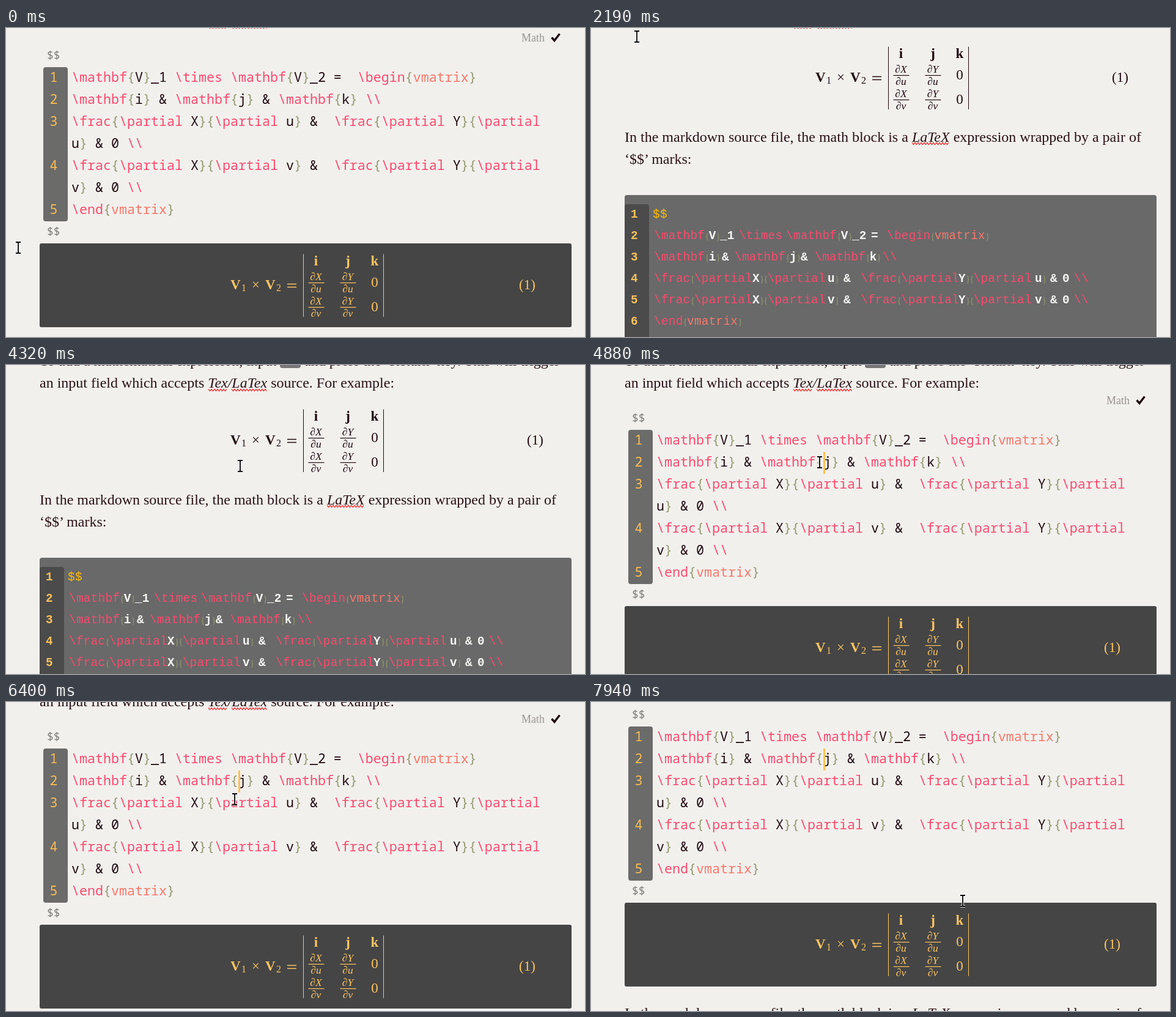
An HTML page for the animation above (8000 ms loop, 947 by 505 pixels).

```html
<!DOCTYPE html>
<html lang="en">
<head>
<meta charset="utf-8">
<title>Math block editing</title>
<style>
html, body { margin: 0; width: 100%; height: 100%; overflow: hidden; background: #f2f0ed; }
svg { display: block; }
text { white-space: pre; }
.prose { font: 24px "Liberation Serif", serif; fill: #2a1216; }
.prose .it { font-style: italic; }
.label { font: 18px "Liberation Serif", serif; fill: #979490; }
.fence { font: 18px "Noto Sans Mono", monospace; fill: #7d7d7a; }
.code { font: 21.67px "Noto Sans Mono", monospace; fill: #200a10; }
.code .cmd, .slab .cmd { fill: #fb4a6e; }
.code .env, .slab .env { fill: #f6796b; }
.code .brace { fill: #949a72; }
.code .num { fill: #fabd55; text-anchor: middle; }
.slab { font: 19.3px "Liberation Mono", monospace; letter-spacing: .32px; fill: #f7f7f5; }
.slab .plain { font-weight: bold; }
.slab .brace { font: 15px "Liberation Serif", serif; letter-spacing: -.8px; fill: #959a70; }
.slab .num { fill: #f9c25c; font-weight: bold; text-anchor: middle; }
.slab .dollar { fill: #fdbc05; }
.math { font: 23px "Liberation Serif", serif; fill: currentColor; }
.math .b { font-weight: bold; }
.math .sub { font-size: 16px; }
.math .frac { font-size: 17.5px; font-style: italic; }
.math .mid { text-anchor: middle; }
.math path { stroke: currentColor; fill: none; }
.wave { stroke: #ee2222; stroke-width: 1.2; fill: none; }
</style>
</head>
<body>
<svg id="stage" width="947" height="505" viewBox="0 0 947 505"></svg>
<script>
const raw = String.raw;
const range = n => [...Array(n).keys()];
const esc = s => s.replace(/&/g, "&amp;").replace(/</g, "&lt;");
const text = (x, y, s, cls = "") => `<text x="${x}" y="${y}" class="${cls}">${s}</text>`;
const rect = (x, y, w, h, fill, r = 0) =>
  `<rect x="${x}" y="${y}" width="${w}" height="${h}" rx="${r}" fill="${fill}"/>`;

function kind(token) {
  if (token[0] === "\\") return "cmd";
  if (token === "vmatrix") return "env";
  if (token === "$$") return "dollar";
  return /^[{}]+$/.test(token) ? "brace" : "plain";
}

function highlight(line) {
  return line.match(/\\[a-z]+|\\\\|vmatrix|[{}]+|[^\\{}]+/g)
    .map(t => `<tspan class="${kind(t)}">${esc(t)}</tspan>`).join("");
}

function wave(x1, x2, y) {
  const steps = Math.round((x2 - x1) / 2.5);
  const points = range(steps + 1).map(i => `${x1 + i * 2.5},${y + (i % 2 ? 1.6 : -1.6)}`);
  return `<polyline class="wave" points="${points.join(" ")}"/>`;
}

const fracLine = v => raw`\frac{\partial X}{\partial ${v}} &  \frac{\partial Y}{\partial ${v}} & 0 \\`;
const source = [
  raw`\mathbf{V}_1 \times \mathbf{V}_2 =  \begin{vmatrix}`,
  raw`\mathbf{i} & \mathbf{j} & \mathbf{k} \\`,
  fracLine("u"),
  fracLine("v"),
  raw`\end{vmatrix}`
];

// Lines too long for the editor wrap before the last variable.
const editRows = source.flatMap((line, i) => {
  const cut = line.length > 60 ? line.lastIndexOf(" &") - 2 : line.length;
  const rows = [[i + 1, line.slice(0, cut)]];
  if (cut < line.length) rows.push(["", line.slice(cut)]);
  return rows;
});

// Left edges of the words in each kind of line.
const fracEdges = [103, 264, 387, 413, 441, 601, 726, 751, 771, 790];
const edges = [
  [103, 242, 319, 458, 484],
  [103, 214, 235, 343, 366, 477],
  fracEdges,
  fracEdges,
  [103]
];

function slabRow(line, i) {
  const y = 310 + 35 * i;
  const xs = edges[i - 1] || [101];
  const words = line.split(/ +/).map((w, k) => text(xs[k], y, highlight(w)));
  return text(71, y, i + 1, "num") + words.join("");
}

function fraction(x, y, top, bottom) {
  return text(x, y - 4, "∂" + top, "frac mid") + text(x, y + 16, "∂" + bottom, "frac mid") +
    `<path d="M${x - 12.5} ${y + .5}h26" stroke-width="1.2"/>`;
}

function formula(color, labelX) {
  const row = (v, y) => fraction(507, y, "X", v) + fraction(559, y, "Y", v) + text(603, y + 7, 0, "mid");
  return `<g class="math" style="color:${color}">` +
    text(367, 88, "V", "b") + text(385, 91, 1, "sub") + text(402, 88, "×") +
    text(424, 88, "V", "b") + text(442, 91, 2, "sub") +
    `<path d="M460 79.5h15M460 84.5h15" stroke-width="1.3"/>` +
    `<path d="M486.5 30.5v102.5M617.5 30.5v102.5"/>` +
    text(507, 49, "i", "b mid") + text(559, 49, "j", "b mid") + text(603, 49, "k", "b mid") +
    row("u", 77) + row("v", 117) + text(labelX, 88, "(1)") + "</g>";
}

const head =
  rect(448, -64, 34, 27, "#777", 4) +
  `<g class="prose">` +
  text(55, -41, "To add a mathematical expression, input") +
  text(488, -41, "and press the ‘Return’ key. This will trigger") +
  text(55, -5, `an input field which accepts <tspan class="it">Tex/LaTex</tspan> source. For example:`) +
  "</g>" + wave(331, 361, -1) + wave(369, 427, -1);

const editor =
  text(843, 22, "Math", "label") +
  `<path d="M892.5 15.5l4.5 5l8.5 -11" fill="none" stroke="#200a10" stroke-width="3.4"/>` +
  text(67, 51, "$$", "fence") + text(67, 339, "$$", "fence") +
  rect(61, 64, 40, 252, "#6b6b69", 4) +
  `<g class="code">` + editRows.map(([n, line], i) =>
    text(78, 88 + 36 * i, n, "num") + text(107, 88 + 36 * i, highlight(line))).join("") + "</g>" +
  rect(55, 352, 870, 137, "#454545", 3) +
  `<g transform="translate(0 339)">${formula("#fdc562", 839)}</g>`;

const tail =
  `<g class="prose">` +
  text(55, 186, `In the markdown source file, the math block is a <tspan class="it">LaTeX</tspan> expression wrapped by a pair of`) +
  text(55, 222, "‘$$’ marks:") + "</g>" + wave(525, 586, 189) +
  rect(55, 273, 870, 300, "#696969", 4) + rect(55, 288, 40, 285, "#4b4b4b", 4) +
  `<g class="slab">${["$$", ...source, "$$"].map(slabRow).join("")}</g>`;

const beam = "M-4 -9h3l1 1l1 -1h3M0 -8v16M-4 9h3l1 -1l1 1h3";

document.getElementById("stage").innerHTML =
  `<g id="page">${head}
    <g id="edit">${editor}</g>
    <g id="view">${formula("#200a10", 852)}</g>
    <g id="tail">${tail}</g>
    <g id="editCaret">${rect(380, 100, 3, 36, "#fdc155")}</g>
    <g id="viewCaret">${rect(634, -27, 1.5, 27, "#200a10")}</g>
  </g>
  <g id="mouse" fill="none">
    <path d="${beam}" stroke="#fff" stroke-width="3.5"/>
    <path d="${beam}" stroke="#000" stroke-width="1.8"/>
  </g>`;

// time, x, y
const mouseSteps = [
  [0, 20, 359], [710, 62, 240], [830, 101, 130], [980, 91, 106],
  [1260, 85, 41], [1410, 75, 14], [3090, 140, 92], [3210, 188, 150],
  [4030, 193, 152], [4180, 246, 167], [4320, 383, 165], [4610, 374, 159],
  [7430, 428, 212], [7550, 572, 334], [7670, 679, 406], [7790, 676, 409],
  [7940, 608, 325]
];

// time, page offset
const scrollSteps = [
  [0, 0], [3610, 6], [3760, 18], [3880, 32], [4030, 42],
  [6130, 38], [6280, 26], [6400, 12], [6550, -1], [6700, -9],
  [6820, -15], [6970, -23], [7130, -24]
];

// The caret starts hidden and flips at each of these times.
const caretFlips = [2190, 4180, 4880, 5450, 5980, 6550, 7130, 7670, 7940];

const part = id => document.getElementById(id);
const [page, edit, view, tailPart, editCaret, viewCaret, mouse] =
  ["page", "edit", "view", "tail", "editCaret", "viewCaret", "mouse"].map(part);
const show = (el, on) => { el.style.display = on ? "" : "none"; };
const move = (el, x, y) => el.setAttribute("transform", `translate(${x} ${y})`);
const at = (steps, t) => steps.findLast(s => s[0] <= t);
const start = performance.now();

function draw() {
  const t = Math.max(0, performance.now() - start) % 8000;
  const editing = t < 2190 || t >= 4880;
  const caret = caretFlips.filter(f => f <= t).length % 2;
  const [, x, y] = at(mouseSteps, t);
  move(page, 0, at(scrollSteps, t)[1]);
  move(tailPart, 0, editing ? 354 : 0);
  move(mouse, x, y);
  show(edit, editing);
  show(view, !editing);
  show(editCaret, editing && caret);
  show(viewCaret, !editing && caret);
  requestAnimationFrame(draw);
}
draw();
</script>
</body>
</html>
```
